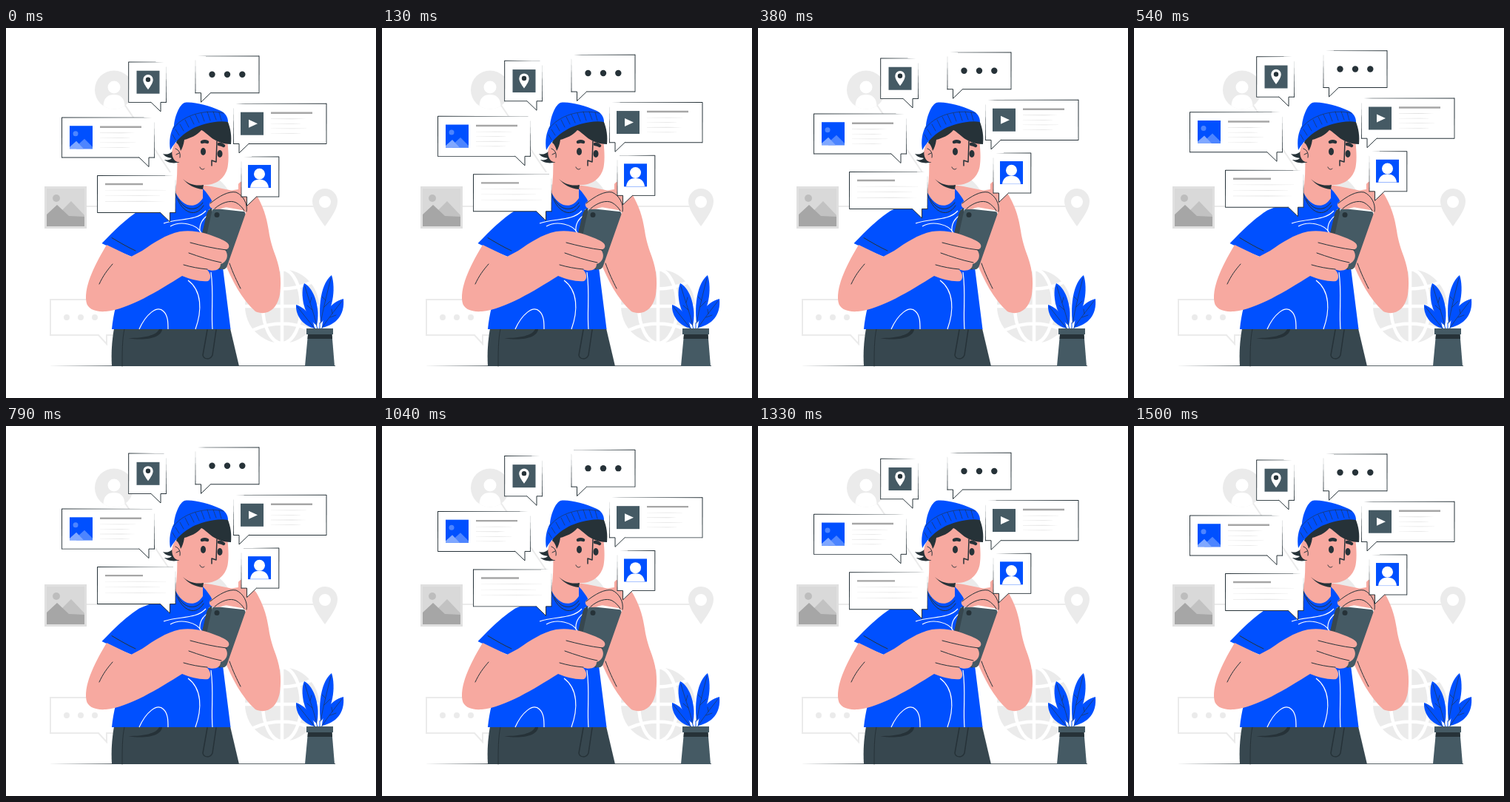
Animation, 500 px wide and 500 px high, one loop 1.54 s. Source, as an HTML page:

```html
<!DOCTYPE html>
<html lang="en">
<head>
<meta charset="utf-8">
<title>Chatting on the phone</title>
<style>
html, body { margin: 0; width: 100%; height: 100%; overflow: hidden; background: #fff; }
svg { display: block; width: 100vw; height: 100vh; }
.ink { fill: none; stroke: #263238; stroke-width: 1; stroke-linecap: round; stroke-linejoin: round; }
.fine { stroke-width: .6; }
.bold { stroke-width: 1.5; }
.thread { fill: none; stroke: #fff; stroke-width: 1.2; }
.pale { fill: #ebebeb; }
.wire { fill: none; stroke: #ebebeb; stroke-width: 2; }
.blue { fill: #0050ff; }
.skin { fill: #f7a9a0; }
.dark { fill: #263238; }
.slate { fill: #455a64; }
.pants { fill: #37474f; }
.white { fill: #fff; }
</style>
</head>
<body>
<svg viewBox="0 0 500 500" xmlns="http://www.w3.org/2000/svg">
  <g id="backdrop">
    <path class="wire" d="M158 100L222 195M109 241H240M340 241H416"/>
    <circle class="pale" cx="262" cy="241" r="44"/>
    <circle class="pale" cx="146" cy="83.500" r="26"/>
    <circle class="white" cx="146" cy="80" r="8.500"/>
    <path class="white" d="M131.500 105C132 94 138 90 146 90S160 94 160.500 105C152 111 140 111 131.500 105Z"/>
    <path fill="#e0e0e0" d="M52 214H109V271H52Z"/>
    <path fill="#d9d9d9" d="M55 217H106V268H55Z"/>
    <circle fill="#bdbdbd" cx="68" cy="230" r="5"/>
    <path fill="#c2c2c2" d="M74 248L88 234L106 253V262H74Z"/>
    <path fill="#a6a6a6" d="M55 268V252L69 239L85 254L106 255V268Z"/>
    <path class="pale" fill-rule="evenodd" d="M431 268C421 254 414 244 414 234A17 17 0 0 1 448 234C448 244 441 254 431 268ZM423 235A8 8 0 0 0 439 235A8 8 0 0 0 423 235Z"/>
    <path class="wire" d="M60 367H150V415H136V427L125 415H60Z"/>
    <g class="pale"><circle cx="82" cy="391" r="4"/><circle cx="101" cy="391" r="4"/><circle cx="120" cy="391" r="4"/></g>
    <circle class="pale" cx="373" cy="376" r="50"/>
    <g fill="none" stroke="#fff" stroke-width="4.500">
      <path d="M373 326V426M323 376H423M334 344Q373 361 412 344M334 408Q373 391 412 408"/>
      <ellipse cx="373" cy="376" rx="26" ry="50"/>
    </g>
  </g>

  <path class="dark" d="M57 456.500L150 456.200H445V457H150Z"/>

  <g id="plant">
    <path d="M424 398V407M419 400L421 407M416 404L419 408M428 403L426 408" fill="none" stroke="#0050ff" stroke-width="1"/>
    <g class="blue">
      <path d="M425 399C422 374 426 345 440 334C446 352 442 384 425 399Z"/>
      <path d="M420 402C402 390 397 358 403 345C417 352 425 380 420 402Z"/>
      <path d="M417 406C403 403 391 390 392 374C405 378 415 392 417 406Z"/>
      <path d="M427 405C428 388 438 370 456 366C458 388 446 401 427 405Z"/>
    </g>
    <path class="ink fine" d="M425 399C429 378 434 358 439 338M420 402C415 382 408 364 404 349M417 406C409 396 401 386 394 377M427 405C436 392 446 379 454 369M430 377L438 369M432 368L427 363M414 381L407 375M411 371L413 364M438 391L446 388M441 386L440 380"/>
    <path class="slate" d="M408 414H440.500L444 457H404Z"/>
    <path class="dark" d="M408 414H440.500L441 420H407.500Z"/>
    <path class="slate" d="M406 406H442V414H406Z"/>
  </g>

  <g id="person">
    <path class="pants" d="M146 406H303L315 457H143C142 438 143 424 146 406Z"/>
    <path class="dark" d="M165 419C188 423 210 419 211 407H207C203 416 186 419 165 419Z"/>
    <path class="ink" d="M160 407C157 420 157 440 157 457"/>
    <path class="ink bold" d="M272 408L266 442C267 448 276 449 279 442L284 408"/>

    <path class="skin" d="M264 212C282 214 300 219 318 222L330 245L276 250Z"/>
    <path class="blue" d="M129.500 291C147 273 162 258 180 246.500C196 240 214 234 229 222C240 243 258 240 266 217C271 222 276 229 279 235L290 300L303.500 407H143C145 387 150 365 160 345L170 309C155 303 142 297 129.500 291Z"/>
    <path class="skin" d="M231 172C232 190 231 206 229 222C238 242 256 246 266 230V208Z"/>
    <path class="ink" d="M229 224C235 246 254 260 267 240M233 231C241 247 257 249 266 236M143 283.500C154 290 164 296 175 301"/>
    <path class="thread" d="M213 264C232 257 258 261 270 247M222 268C236 260 258 265 264 277M262 275C261 265 266 257 273 253M246 341C265 355 265 382 256 407M180 407C189 387 204 374 213 383C219 389 219 398 219 407M277 330C281 358 277 382 279 407"/>

    <path class="dark" d="M212 170C220 172 225 168 226 164L235 181C227 184 218 182 214 178C219 179 222 178 224 176C219 175 215 174 212 170Z"/>
    <path class="skin" d="M235 148C250 132 285 130 299 150C300.500 165 301.500 177 299.500 188C296 204 283 213 266 212C250 210 236 199 234 181C226 182 221 169 227 158C229 154 232 154 235 158Z"/>
    <path class="dark" d="M239 204C247 211 256 214 267 212L266 218C255 217 246 212 239 204Z"/>
    <path class="dark" d="M230 155C234 136 261 121 299 125C304 136 305 147 304 157C293 157 283 153 276 147C271 143 267 139 264 138C258 145 249 149 241 151C240 158 238 163 236 166C235 161 233 157 230 155Z"/>
    <path class="blue" d="M222 165C220 152 222 141 227 132C228 120 234 104 241 101C253 99 274 105 288 111C296 114 300 120 300 127C284 124 262 131 252 136C241 142 230 151 222 165Z"/>
    <path class="ink fine" d="M226 136C238 119 266 109 294 115M225 144L229 151M229 137L234 145M235 130L240 139M242 124L247 134M249 120L254 130M256 117L261 128M264 115L268 126M272 113L276 125M280 113L284 124M288 114L291 125"/>
    <path class="ink" d="M229 163C234 165 236 169 235 175M230 171L234 169M262 188C263 191 266 192 268 190"/>
    <path class="ink bold" d="M285 153L284 181L278 179V186"/>
    <path d="M265 154Q268.500 152.500 272 154M288 157Q291 157 294 159" fill="none" stroke="#263238" stroke-width="4.500" stroke-linecap="round"/>
    <ellipse class="dark" cx="266.500" cy="167" rx="3.500" ry="5"/>
    <ellipse class="dark" cx="289" cy="170" rx="3.500" ry="5"/>

    <path class="skin" d="M322 212C332 218 338 223 341 230C350 247 353 260 356 280C358 290 360 296 362 302C370 322 373 340 370 360C366 383 350 389 337 383C318 366 305 340 296 318L320 248Z"/>
    <path class="ink" d="M302 318C307 332 312 342 317 352"/>
    <path class="white" d="M274 245L296 242L324 247V251L276 248Z"/>
    <path class="pants" d="M278 243C274 245 272 248 271 252L262 290L284 325L290 327Z"/>
    <path class="slate" d="M283 244L320 248C323 248 324 250 323 253L299 321C298 325 295 327 291 326L268 315C267 300 271 280 278 249C279 245 280 244 283 244Z"/>
    <circle class="dark" cx="285" cy="252.500" r="3.500"/>
    <path class="skin" d="M275 237C284 227 297 220 314 218L314 211C318 205 323 208 323 216L332 235L324 249C316 243 305 239 294 243C285 247 273 245 275 237Z"/>
    <path class="ink" d="M276 237C288 227 301 220 311 222C320 226 327 237 325 248M282 244C291 236 303 232 311 236C316 239 320 243 322 247"/>

    <path class="skin" d="M136 293C123 315 105 347 108.500 370C110 380 121 384 135 383C166 380 206 355 238 335C250 340 263 343 273 342C278 339 277 331 271 326C281 330 290 327 290 319C298 317 302 307 296 300C304 298 303 291 294 287C275 278 255 272 235 275C216 279 200 290 184 301L169 309Z"/>
    <path class="ink" d="M249 290C264 294 281 298 298 300M247 304C261 309 276 314 291 317M240 320C250 323 261 325 272 326M126 346C131 335 137 327 144 319"/>
  </g>

  <g id="bubbles"></g>
</svg>
<script>
const LOOP = 1540, FLOAT = 1500, RISE = 10, FPS = 24, FRAMES = 37;
const layer = document.getElementById('bubbles');

// A thin stroke whose weight runs from a to b.
function taper(x1, y1, x2, y2, a, b, fill = '#263238') {
  const len = Math.hypot(x2 - x1, y2 - y1);
  const nx = (y1 - y2) / len / 2, ny = (x2 - x1) / len / 2;
  return `<path fill="${fill}" d="M${x1 + nx * a} ${y1 + ny * a}L${x2 + nx * b} ${y2 + ny * b}` +
    `L${x2 - nx * b} ${y2 - ny * b}L${x1 - nx * a} ${y1 - ny * a}Z"/>`;
}

// Speech bubble; the side holding the tail fades out towards its top.
function bubble(x, y, r, b, tailRight, content) {
  const near = tailRight ? r : x, far = tailRight ? x : r, s = tailRight ? -1 : 1;
  const tip = near + 7.5 * s, root = near + 20.5 * s, h = b - y;
  const shape = `M${far} ${y}H${near}V${b}H${tip}V${b + 12.5}L${root} ${b}H${far}Z`;
  return `<path class="white" d="${shape}"/>` +
    taper(far, y, near + 14 * s, y, 1, .4) +
    taper(near + 14 * s, y, near + 3 * s, y, .3, .05) +
    taper(far, y - .4, far, b + .4, 1, .9) +
    taper(far, b, root, b, .9, .9) +
    taper(near, b + .4, near, y + h * .42, .9, .4) +
    taper(near, y + h * .42, near, y + h * .1, .3, .05) +
    `<path class="ink" d="M${root} ${b}L${tip} ${b + 12.5}V${b}H${near}"/>` + content;
}

function textLines(x, y, bar, rows, width, gap) {
  let out = `<path fill="#a6a6a6" d="M${x} ${y - 1.2}h${bar}v2.4h${-bar}Z"/>`;
  for (let i = 0; i < rows; i++) {
    const ly = y + 8 + i * gap, end = x + width - (i % 2 ? 8 : 0), mid = x + width * .6;
    out += taper(x, ly, mid, ly, .3, .8, '#e0e0e0') + taper(mid, ly, end, ly, .8, .2, '#e0e0e0');
  }
  return out;
}

const tile = (x, y, cls) => `<path class="${cls}" d="M${x} ${y}h31v31h-31Z"/>`;
const dot = (x, y, r, cls) => `<circle class="${cls}" cx="${x}" cy="${y}" r="${r}"/>`;

const picture = tile(86, 132.5, 'blue') +
  '<circle cx="94" cy="143" r="3.500" fill="#4d85ff"/>' +
  '<path fill="#4d85ff" d="M95 160L106 150L117 161V163.500H95Z"/>' +
  '<path fill="#80a8ff" d="M86 163.500V161L95 153L105 163.500Z"/>';

const pin = tile(176.5, 58, 'slate') +
  '<path class="white" d="M192 83.500C188 78 185.300 74 185.300 70A6.700 6.700 0 0 1 198.700 70C198.700 74 196 78 192 83.500Z"/>' +
  dot(192, 70, 3.2, 'dark');

const film = tile(317, 114, 'slate') + '<path class="white" d="M328 124L340 129.500L328 135Z"/>';

const contact = tile(327, 185.3, 'blue') + dot(342.5, 197.5, 7.5, 'white') +
  '<path class="white" d="M330 216C331 208 336 205 342.500 205S354 208 355 216Z"/>';

layer.innerHTML =
  bubble(75.5, 121.3, 200.5, 175.3, true, picture + textLines(127, 134, 56, 4, 48, 6.6)) +
  bubble(123.5, 199.8, 229, 249.7, true, textLines(134, 211.3, 51, 3, 82, 7.6)) +
  bubble(165.7, 46.3, 216.5, 100.7, true, pin) +
  bubble(256, 38.2, 342, 88, false, [278.5, 299, 319.3].map(x => dot(x, 63, 4.2, 'dark')).join('')) +
  bubble(307.5, 102.5, 433, 156.7, false, film + textLines(358, 115, 56, 4, 48, 6.6)) +
  bubble(318, 174.3, 368.8, 228.3, false, contact);

function draw(ms) {
  const step = Math.floor((ms % LOOP + 6) / (LOOP / FRAMES)) % FRAMES;
  const phase = (step * 1000 / FPS + 20) % FLOAT / FLOAT;
  const lift = RISE * (1 - Math.abs(2 * phase - 1));
  layer.setAttribute('transform', `translate(0 ${-lift.toFixed(3)})`);
}

const start = performance.now();
function tick() {
  draw(performance.now() - start);
  requestAnimationFrame(tick);
}
tick();
</script>
</body>
</html>
```
